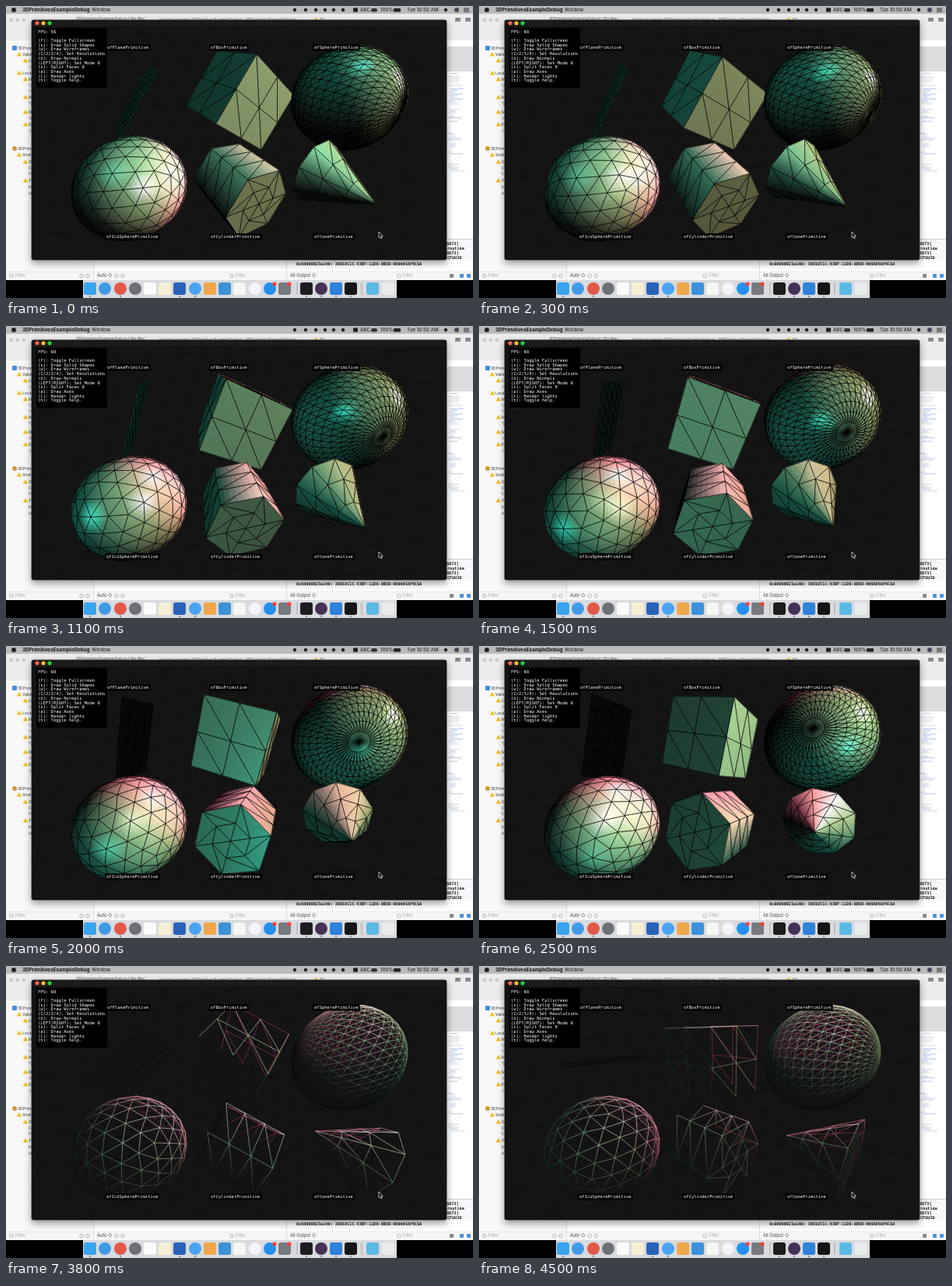
Recreate the animation shown at these times as an HTML page with a canvas. Size 600 by 375 pixels, loop 4600 ms.

```html
<!DOCTYPE html>
<html lang="en">
<head>
<meta charset="utf-8">
<title>3D primitives</title>
<style>
html, body { margin: 0; width: 100%; height: 100%; overflow: hidden; background: #000; }
canvas { position: absolute; left: 0; top: 0; }
#view { left: 33px; top: 26px; border-radius: 0 0 3px 3px; }
</style>
</head>
<body>
<canvas id="desk" width="600" height="375"></canvas>
<canvas id="view" width="533" height="300"></canvas>
<script>
const desk = document.getElementById('desk').getContext('2d');
const g = document.getElementById('view').getContext('2d');
const SANS = 'Inter, Roboto, sans-serif', MONO = '"DejaVu Sans Mono", monospace';
const TAU = 2 * Math.PI, W = 533, H = 300, EYE = 259.8, LOOP = 4600;
const CLOCK = 26.12, WIRE_FROM = 2.8;   // scene clock at the loop start, seconds until the fill goes off

// ---------- desktop ----------
function box(c, x, y, w, h, fill, r = 0) {
  c.fillStyle = fill;
  c.beginPath();
  c.roundRect(x, y, w, h, r);
  c.fill();
}
function dot(c, x, y, r, fill) { box(c, x - r, y - r, 2 * r, 2 * r, fill, r); }
function text(c, s, x, y, font, fill = '#333') {
  c.font = font;
  c.fillStyle = fill;
  c.fillText(s, x, y);
}
function warning(x, y) {
  desk.fillStyle = '#f3bd1d';
  desk.beginPath();
  desk.moveTo(x, y - 3);
  desk.lineTo(x + 3.2, y + 2.6);
  desk.lineTo(x - 3.2, y + 2.6);
  desk.fill();
}

function drawDesk() {
  const small = '5.6px ' + SANS, tiny = '5px ' + SANS, c = desk;
  c.textBaseline = 'middle';
  box(c, 0, 0, 600, 352, '#f8f8f8');
  box(c, 0, 10, 600, 33, '#ececec');
  box(c, 0, 43, 600, .6, '#cfcfcf');
  for (const x of [7, 15, 23]) dot(c, x, 18, 2.4, '#cdcdcd');
  text(c, '3DPrimitivesExampleDebug ) My Mac', 90, 16.5, tiny, '#555');
  text(c, 'Finished running 3DPrimitivesExampleDebug : 3DPrimitivesExampleDebug', 197, 17, tiny, '#666');
  warning(398, 17);
  text(c, '55', 403, 17, tiny, '#666');
  for (const x of [577, 590]) box(c, x, 15, 7, 5, '#8a8a8a', 1);

  // issue list
  const rows = [['3DPrimi', 54, 15], ['Valida', 62, 21], ['Up', 70, 29], ['3D', 78, 29], ['Locali', 86, 21],
    ['Mi', 94, 29], ['"Ja', 102, 29], ['3D', 109, 29], ['Mi', 117, 29], ['"D', 125, 29], ['Mi', 136, 29],
    ['3D', 144, 29], ['En', 152, 29], ['3D', 160, 29], ['3DPrimi', 183, 15], ['Shell', 191, 21], ['Sk', 200, 29],
    ['Co', 208, 29], ['Us', 215, 29], ['Tr', 224, 29], ['lon', 232, 29], ['usin', 240, 29]];
  for (const [s, y, x] of rows) text(c, s, x, y, tiny, /3D$/.test(s) ? '#888' : '#333');
  for (const y of [62, 86, 191]) warning(17, y);
  for (const y of [70, 94, 117, 136, 152, 200, 224]) warning(25, y);
  box(c, 8, 51, 6, 6, '#3f8fe0', 1);
  dot(c, 11, 183, 3, '#d79a3c');

  // editor on the right
  box(c, 566, 44, 34, 256, '#fff');
  box(c, 566, 52, 34, 32, '#dcdcdc');
  let seed = 7;
  const rnd = () => (seed = seed * 16807 % 2147483647) / 2147483647;
  for (let y = 86; y < 212; y += 2.2)
    if (rnd() < .6) box(c, 567 + 5 * rnd(), y, 4 + 14 * rnd(), 1, rnd() < .6 ? '#b4c4ea' : '#d6dade');

  // console
  box(c, 112, 326, 488, 15, '#fff');
  box(c, 566, 299, 34, 1, '#ccc');
  const bold = 'bold 5.17px ' + MONO;
  ['8873]', 'routine', '8873]', 'CFUUID'].forEach((s, i) => text(c, s, i % 2 ? 567 : 566, 306 + i * 6, bold, '#111'));
  text(c, '0x60000023a140> 30010C1C-93BF-11D8-8B5B-000A95AF9C6A', 373, 331.5, bold, '#111');
  box(c, 0, 341, 600, 11, '#f6f6f6');
  box(c, 0, 341, 600, .6, '#d5d5d5');
  for (const x of [112, 360]) box(c, x, 326, .7, 26, '#d0d0d0');
  for (const [s, x] of [['Filter', 12], ['Auto ◇', 117], ['Filter', 295], ['All Output ◇', 365], ['Filter', 510]])
    text(c, s, x, 346.5, small, s === 'Filter' ? '#aaa' : '#444');
  c.strokeStyle = '#999';
  c.lineWidth = .7;
  for (const x of [7, 97, 105, 142, 150, 290, 505]) {
    c.beginPath();
    c.arc(x, 346.5, 2.3, 0, TAU);
    c.stroke();
  }
  for (const [x, fill] of [[570, '#888'], [583, '#4a90e2'], [592, '#4a90e2']]) box(c, x, 344, 5, 5, fill, 1);

  // menu bar
  box(c, 0, 0, 600, 10, '#bababa');
  dot(c, 10, 5, 3, '#222');
  text(c, '3DPrimitivesExampleDebug', 21, 5.3, 'bold 6.35px ' + SANS, '#111');
  const menu = '6.3px ' + SANS;
  for (const [s, x] of [['Window', 110], ['ABC', 455], ['100%', 481], ['Tue 10:50 AM', 515]]) text(c, s, x, 5.3, menu, '#111');
  for (const x of [371, 385, 398, 410, 421, 433, 565]) dot(c, x, 5, 2.2, '#222');
  box(c, 446, 2.3, 6, 5.4, '#222', 1);
  box(c, 469, 3, 8, 4.5, '#333', 2);
  box(c, 498, 3, 9, 4.4, '#222', 1);
  dot(c, 579, 5, 3, '#4a4560');
  for (const y of [3, 5, 7]) box(c, 588, y - .4, 7, .9, '#222');

  // dock
  box(c, 0, 352, 600, 23, '#000');
  box(c, 99, 352, 403, 23, '#d9dadd');
  const icons = [[108, '#39a4ee'], [127, '#3f9be8', 1], [147, '#e2594a', 1], [166, '#6d7075', 1], [185, '#fafafa'],
    [204, '#f7f0d5'], [223, '#2b63b8'], [243, '#4aa3f2', 1], [262, '#eea849'], [281, '#3d91d8'], [300, '#f4f7f2'],
    [320, '#f6f3f8', 1], [339, '#2390ee', 1], [358, '#777b80'], [386, '#1d1d1f'], [405, '#463256', 1],
    [424, '#2f82da'], [443, '#161616'], [471, '#5cb8e6'], [491, '#e9ebed']];
  for (const [x, fill, round] of icons) box(c, x - 8, 355, 16, 16, fill, round ? 8 : 3);
  for (const x of [345, 364]) dot(c, x, 357, 2.6, '#f0433a');
  for (const x of [374, 457]) box(c, x - .4, 355, .8, 16, '#9d9fa2');
  for (const x of [108, 147, 223, 243, 386, 405, 424, 443]) dot(c, x, 373, .8, '#222');

  // application window frame
  c.shadowColor = 'rgba(0,0,0,.4)';
  c.shadowBlur = 10;
  c.shadowOffsetY = 4;
  box(c, 32.5, 17.5, W + 1, 309, '#4a4a4a', 3);
  c.shadowColor = 'transparent';
  box(c, 33, 18, W, 308, '#1b1b1b', 3);
  ['#f85f57', '#f9bd2f', '#2ac940'].forEach((fill, i) => dot(c, 40 + 8 * i, 22, 2.6, fill));
}

// ---------- geometry ----------
const sub = (a, b) => a.map((v, i) => v - b[i]);
const dot3 = (a, b) => a[0] * b[0] + a[1] * b[1] + a[2] * b[2];
const cross = (a, b) => [a[1] * b[2] - a[2] * b[1], a[2] * b[0] - a[0] * b[2], a[0] * b[1] - a[1] * b[0]];
const unit = v => v.map(x => x / Math.hypot(...v));
const keyOf = v => v.map(x => Math.round(x * 1e3)).join();

// triangles over a unit square mapped by f(u, v) -> [position, normal]
function grid(nu, nv, f) {
  const tris = [], pts = [];
  for (let j = 0; j <= nv; j++)
    for (let i = 0; i <= nu; i++) {
      const [p, n] = f(i / nu, j / nv);
      pts.push({ p, n: unit(n) });
    }
  for (let j = 0; j < nv; j++)
    for (let i = 0; i < nu; i++) {
      const k = j * (nu + 1) + i, a = pts[k], b = pts[k + 1], c = pts[k + nu + 1], d = pts[k + nu + 2];
      tris.push([a, b, c], [b, d, c]);
    }
  return tris;
}

// where faces share an edge, the face listed first lights it
function mesh(x, y, tris, open = false) {
  const faces = [], edges = {};
  for (const [a, b, c] of tris) {
    const n = cross(sub(b.p, a.p), sub(c.p, a.p));
    if (Math.hypot(...n) < 1e-4) continue;
    const out = dot3(n, a.p) + dot3(n, b.p) + dot3(n, c.p) >= 0;
    faces.push(out ? [a, b, c] : [a, c, b]);
    for (const edge of [[a, b], [b, c], [c, a]])
      edges[edge.map(v => keyOf(v.p)).sort().join('|')] ||= edge;
  }
  return { at: [x, y, 0], verts: [...new Set(tris.flat())], faces, edges: Object.values(edges), open };
}

const ring = (u, r, y) => [r * Math.cos(TAU * u), y, r * Math.sin(TAU * u)];
const cap = (seg, r, y) => grid(seg, 2, (u, v) => [ring(u, r * v, y), [0, y, 0]]);
function globe(r) {
  return grid(40, 20, (u, v) => {
    const n = ring(u, Math.sin(Math.PI * v), Math.cos(Math.PI * v));
    return [n.map(x => x * r), n];
  });
}
function cube(size) {
  const tris = [];
  for (const [axis, side] of [[2, 1], [0, 1], [0, -1], [2, -1], [1, 1], [1, -1]])
    tris.push(...grid(2, 2, (u, v) => {
      const p = [], n = [0, 0, 0];
      p[axis] = side * size / 2;
      p[(axis + 1) % 3] = size * (u - .5);
      p[(axis + 2) % 3] = size * (v - .5);
      n[axis] = side;
      return [p, n];
    }));
  return tris;
}
function icoSphere(r, depth) {
  const phi = (1 + Math.sqrt(5)) / 2, base = [], known = {}, tris = [];
  const vert = p => {
    const n = unit(p);
    return known[keyOf(n)] ||= { p: n.map(x => x * r), n };
  };
  const mid = (a, b) => vert(a.p.map((x, i) => x + b.p[i]));
  const split = (a, b, c, d) => {
    if (!d) return tris.push([a, b, c]);
    const ab = mid(a, b), bc = mid(b, c), ca = mid(c, a);
    for (const t of [[a, ab, ca], [ab, b, bc], [ca, bc, c], [ab, bc, ca]]) split(...t, d - 1);
  };
  for (const s of [-1, 1]) for (const q of [-phi, phi]) base.push([0, s, q], [s, q, 0], [q, 0, s]);
  const near = (a, b) => Math.hypot(...sub(a, b)) < 2.1;
  base.forEach((a, i) => base.forEach((b, j) => base.forEach((c, k) => {
    if (i < j && j < k && near(a, b) && near(b, c) && near(a, c)) split(vert(a), vert(b), vert(c), depth);
  })));
  return tris;
}

const X = W / 4, Y = 55, TALL = 79;
const shapes = [
  mesh(-X, Y, grid(6, 4, (u, v) => [[96 * (u - .5), 54 * (v - .5), 0], [0, 0, 1]]), true),
  mesh(0, Y, cube(80)),
  mesh(X, Y, globe(64)),
  mesh(-X, -Y, icoSphere(64, 2)),
  mesh(0, -Y, [...cap(6, 45, TALL / 2), ...grid(6, 3, (u, v) => [ring(u, 45, TALL * (v - .5)), ring(u, 1, 0)]), ...cap(6, 45, -TALL / 2)]),
  mesh(X, -Y, [...grid(9, 3, (u, v) => [ring(u, 48 * (1 - v), TALL * (v - .5)), ring(u, TALL, 48)]), ...cap(9, 48, -TALL / 2)])
];
const room = mesh(0, 0, icoSphere(W, 3));

// ---------- motion and light ----------
// all solids share one orientation, known at 1.5 s and spun about the world x and y axes
function pose(t) {
  let axes = [[-.327, -.873, -.361], [.01, -.385, .923], [-.945, .298, .135]];
  const steps = 80, dt = (t - 1.5) / steps;
  for (let i = 0; i < steps; i++) {
    const now = CLOCK + 1.5 + dt * (i + .5);
    const a = Math.PI / 3 * Math.sin(.35 * now) * dt, b = Math.PI / 3 * Math.cos(.075 * now) * dt;
    const ca = Math.cos(a), sa = Math.sin(a), cb = Math.cos(b), sb = Math.sin(b);
    axes = axes.map(([x, y, z]) => {
      const z1 = y * sa + z * ca;
      return [x * cb + z1 * sb, y * ca - z * sa, z1 * cb - x * sb];
    });
  }
  return axes;
}

function lightsAt(t) {
  const s = CLOCK + t, { sin, cos } = Math;
  return [
    { at: [W * (.5 + .3 * cos(.5 * s)), H / 2, 208], diff: [.85, .85, .55], spec: [1, 1, 1] },
    { at: [W * (.5 + .3 * cos(.15 * s)), H * (.5 + sin(.7 * s)), -125], diff: [.933, .224, .53], spec: [.8, .8, .9] },
    { at: [W / 2 * cos(1.5 * s), W / 2 * sin(1.5 * s), W * cos(.2 * s)], diff: [.075, .369, .302], spec: [.07, .59, .53] }
  ];
}

function shade(p, n, lights) {
  const rgb = [.04, .04, .04];   // ambient
  for (const { at, diff, spec } of lights) {
    const l = unit(sub(at, p)), d = dot3(n, l);
    if (d <= 0) continue;
    const shine = Math.max(0, dot3(n, unit([l[0], l[1], l[2] + 1]))) ** 120;
    for (let i = 0; i < 3; i++) rgb[i] += .8 * d * diff[i] + shine * spec[i];
  }
  return rgb.map(c => 255 * Math.min(1, c));
}

// every vertex gets s = [x, y, r, g, b] on the screen
function place(m, axes, lights) {
  const turn = v => [0, 1, 2].map(i => v[0] * axes[0][i] + v[1] * axes[1][i] + v[2] * axes[2][i]);
  for (const v of m.verts) {
    const p = turn(v.p).map((x, i) => x + m.at[i]), k = EYE / (EYE - p[2]);
    v.z = p[2];
    v.s = [W / 2 + p[0] * k, H / 2 - p[1] * k, ...(lights ? shade(p, turn(v.n), lights) : [])];
  }
}

// ---------- drawing ----------
const css = (...s) => 'rgb(' + [2, 3, 4].map(i => Math.round(s.reduce((sum, v) => sum + v[i], 0) / s.length)) + ')';
function trace(...pts) {
  g.moveTo(pts[0][0], pts[0][1]);
  for (const p of pts.slice(1)) g.lineTo(p[0], p[1]);
}
function patch(a, b, c) {
  g.fillStyle = g.strokeStyle = css(a, b, c);
  g.beginPath();
  trace(a, b, c);
  g.closePath();
  g.fill();
  g.stroke();
}
// smooth colour over a triangle by splitting it into small flat ones
function fillTri(a, b, c) {
  const len = (p, q) => Math.hypot(p[0] - q[0], p[1] - q[1]);
  const n = Math.min(7, Math.ceil(Math.max(len(a, b), len(b, c), len(c, a)) / 7));
  const at = (i, j) => a.map((v, k) => v + (b[k] - v) * i / n + (c[k] - v) * j / n);
  for (let i = 0; i < n; i++)
    for (let j = 0; j < n - i; j++) {
      patch(at(i, j), at(i + 1, j), at(i, j + 1));
      if (i + j < n - 1) patch(at(i + 1, j), at(i + 1, j + 1), at(i, j + 1));
    }
}

function drawSolid(m) {
  const seen = m.faces.filter(f => {
    const [a, b, c] = f.map(v => v.s);
    return m.open || (b[0] - a[0]) * (c[1] - a[1]) < (b[1] - a[1]) * (c[0] - a[0]);
  });
  g.lineWidth = .6;
  for (const f of seen) fillTri(...f.map(v => v.s));
  g.strokeStyle = '#000';
  g.lineWidth = .48;
  g.beginPath();
  for (const [a, b, c] of seen) trace(a.s, b.s, c.s, a.s);
  g.stroke();
}

function drawWire(m) {
  g.lineWidth = .52;
  m.edges.sort((e, f) => e[0].z + e[1].z - f[0].z - f[1].z);
  for (const [{ s: a }, { s: b }] of m.edges) {
    const grad = g.createLinearGradient(a[0], a[1], b[0], b[1]);
    grad.addColorStop(0, css(a));
    grad.addColorStop(1, css(b));
    g.strokeStyle = grad;
    g.beginPath();
    trace(a, b);
    g.stroke();
  }
}

const labels = [['ofPlanePrimitive', 97, 27.5], ['ofBoxPrimitive', 230, 27.5], ['ofSpherePrimitive', 363, 27.5],
  ['ofIcoSpherePrimitive', 96, 270.5], ['ofCylinderPrimitive', 230, 270.5], ['ofConePrimitive', 363, 270.5]];
const help = ['(f): Toggle Fullscreen', '(s): Draw Solid Shapes', '(w): Draw Wireframes', '(1/2/3/4): Set Resolutions',
  '(n): Draw Normals', '(LEFT/RIGHT): Set Mode 0', '(z): Split Faces 0', '(a): Draw Axes', '(l): Render lights', '(h): Toggle help.'];

function drawOverlay(t) {
  const font = '5.53px ' + MONO;
  g.textBaseline = 'middle';
  for (const [s, x, y] of labels) {
    box(g, x - 2, y - 4.5, s.length * 3.33 + 4, 8.5, '#000');
    text(g, s, x, y, font, '#fff');
  }
  box(g, 6, 2, 91, 77, '#000');
  text(g, 'FPS: ' + (t < .3 ? 56 : 60), 8, 8, font, '#fff');
  help.forEach((s, i) => text(g, s, 8, 18.5 + 5.72 * i, font, '#fff'));

  g.beginPath();
  trace([446, 264], [446, 271.5], [447.7, 270], [449, 272.8], [450.2, 272.2], [449, 269.5], [451.2, 269.4]);
  g.closePath();
  g.fillStyle = '#000';
  g.strokeStyle = '#fff';
  g.lineWidth = .7;
  g.fill();
  g.stroke();
}

function drawView(t) {
  const axes = pose(t), lights = lightsAt(t);
  g.lineJoin = 'round';
  box(g, 0, 0, W, H, '#141414');
  place(room, axes);
  g.strokeStyle = 'rgba(0,0,0,.35)';
  g.lineWidth = .5;
  g.beginPath();
  for (const [a, b] of room.edges) if (Math.max(a.z, b.z) < 150) trace(a.s, b.s);
  g.stroke();
  for (const m of shapes) {
    place(m, axes, lights);
    (t < WIRE_FROM ? drawSolid : drawWire)(m);
  }
  drawOverlay(t);
}

let start, shown = -1;
function tick(now) {
  start ??= now;
  const step = Math.floor((now - start) % LOOP / 100);   // ten pictures a second
  if (step !== shown) drawView((shown = step) / 10);
  requestAnimationFrame(tick);
}
drawDesk();
drawView(0);
requestAnimationFrame(tick);
</script>
</body>
</html>
```
